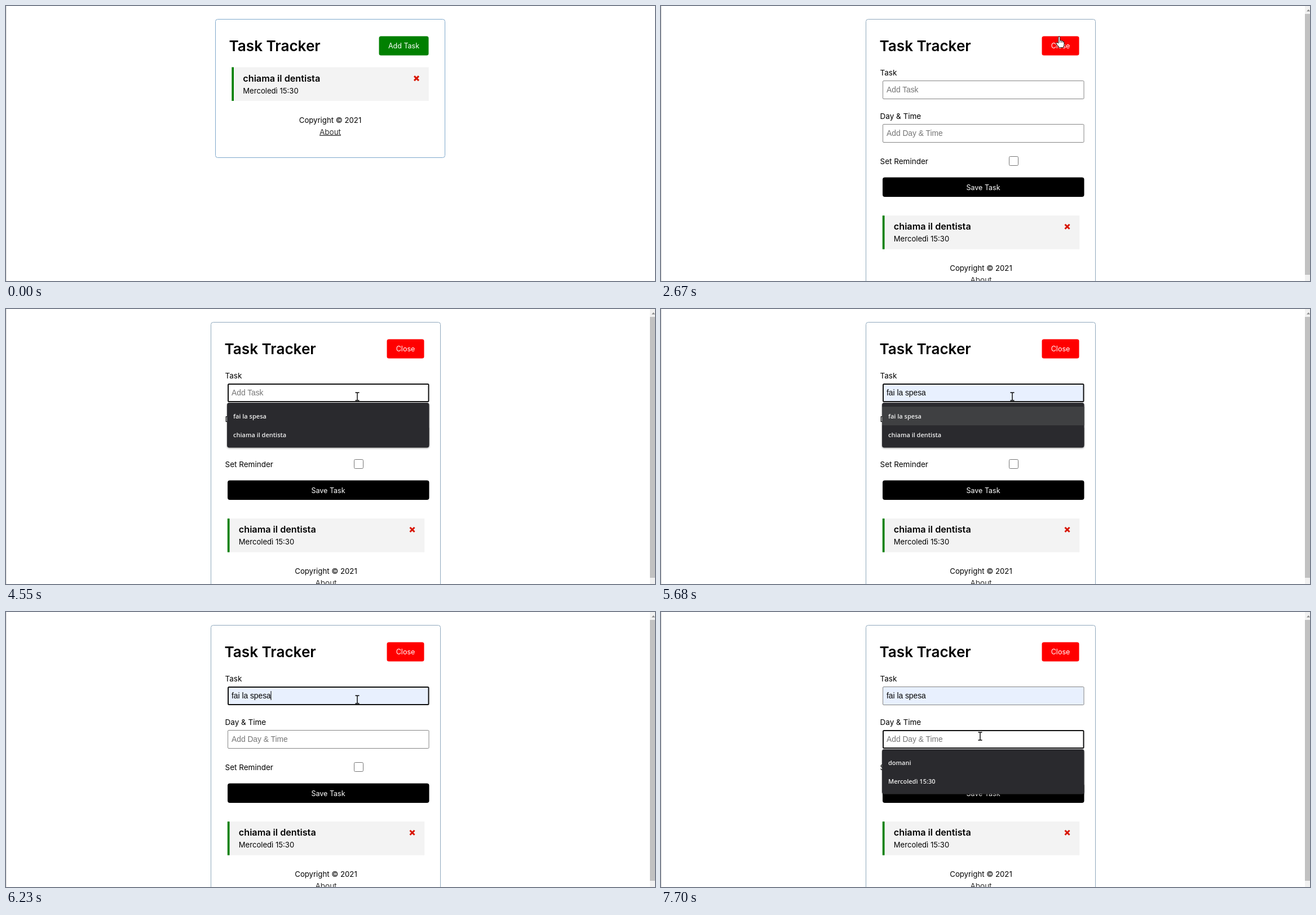
Recreate the animation shown at these times as an HTML page. Size 1151 by 487 pixels, loop 8000 ms.

```html
<!DOCTYPE html>
<html lang="en">
<head>
<meta charset="utf-8">
<title>Task Tracker</title>
<style>
  html, body { margin: 0; width: 100%; height: 100%; overflow: hidden; background: #fff; }
  svg { display: block; width: 100%; height: 100%; }
  text { font: 13.2px Inter, "Open Sans", sans-serif; }
  .title { font-size: 26.1px; font-weight: 600; }
  .task { font-size: 16.2px; font-weight: 600; }
  .when { font-size: 13.1px; }
  .button { font-size: 12.5px; fill: #fff; text-anchor: middle; }
  .label { font-size: 13.5px; }
  .middle { text-anchor: middle; }
  .field { font: 13.8px "Liberation Sans", Arial, sans-serif; }
  .option { font: 600 11px "Open Sans", "Noto Sans", sans-serif; fill: #f0f0f0; }
</style>
</head>
<body>
<svg id="stage" viewBox="0 0 1151 487">
  <defs>
    <filter id="shadow" x="-5%" y="-10%" width="110%" height="125%">
      <feDropShadow dx="0" dy="1" stdDeviation="1.5" flood-opacity=".4"/>
    </filter>
  </defs>
  <g id="scene"></g>
</svg>
<script>
const LOOP = 8000;
const FORM_OPENS = 2670, TASK_FOCUS = 4020, PREVIEW = 5680, CHOSEN = 6030, DAY_FOCUS = 7170;
const scene = document.getElementById('scene');

const rect = (x, y, w, h, fill, more = '') =>
  `<rect x="${x}" y="${y}" width="${w}" height="${h}" fill="${fill}" ${more}/>`;
const text = (x, y, words, style, more = '') =>
  `<text x="${x}" y="${y}" class="${style}" ${more}>${words}</text>`;
const group = (x, y, content, more = '') =>
  `<g transform="translate(${x} ${y})" ${more}>${content}</g>`;
const within = (t, start, end) => t >= start && t < end;

const moves = [
  { start: 510, end: 710, steps: 4, from: [980, 509], to: [760, 248] },
  { start: 1040, end: 1530, steps: 8, from: [760, 248], to: [707, 53] },
  { start: 1790, end: 1791, steps: 2, from: [706, 54], to: [706, 54] },
  { start: 3330, end: 3750, steps: 7, from: [706, 54], to: [623, 155] },
  { start: 6560, end: 6900, steps: 6, from: [623, 155], to: [566, 220] }
];

function pointerAt(t) {
  const move = moves.filter(m => t >= m.start).pop();
  if (!move) return null;
  const interval = (move.end - move.start) / (move.steps - 1);
  const step = Math.floor((t - move.start) / interval + 1e-3) + 1;
  const p = Math.min(1, step / move.steps);
  const eased = p * p * (3 - 2 * p);
  return move.from.map((a, i) => Math.round(a + (move.to[i] - a) * eased));
}

const shapes = {
  arrow: '<path d="M0 0V15L3.6 11.7 6 17 8.2 16 5.9 10.8H10.6Z" fill="#fff" stroke="#000" stroke-width=".9"/>',
  hand: '<path d="M-1.2 12V1.6Q-1.2 0 .2 0T1.6 1.6V7Q4 6 4.5 7.8 6.6 7 7 8.8 9 8.6 9 10.4V14Q9 16 7.2 19.6H0Q-1.5 17-5 12.7-5.8 10.7-4 10.6-2.4 10.8-1.2 12Z" fill="#fff" stroke="#000" stroke-width=".9"/>' +
    '<path d="M1.6 7V11M4.5 8V11M7 9V11" stroke="#000" stroke-width=".8"/>',
  beam: '<path d="M-3.5-7H-1Q0-7 0-6 0-7 1-7H3.5M0-6V6M-3.5 7H-1Q0 7 0 6 0 7 1 7H3.5" fill="none" stroke="#000" stroke-width="1.4"/>'
};

function shapeAt([x, y], formOpen) {
  if (y < 88 && y >= 53 && x > (formOpen ? 675 : 661) && x < 750) return 'hand';
  if (formOpen && (within(y, 132, 165) || within(y, 209, 242))) return 'beam';
  return 'arrow';
}

function header(formOpen, pressed) {
  const [label, fill, centre, width] = formOpen ? ['Close', 'red', 716.5, 66] : ['Add Task', 'green', 705.5, 88];
  const scale = pressed ? 0.98 : 1;
  const button = rect(-width / 2, -17, width, 34, fill, 'rx="3.5"') + text(0, 4.5, label, 'button');
  return rect(371.5, 23.5, 407, 245 + (formOpen ? 263 : 0), 'none',
      `rx="4" stroke="${formOpen ? '#8fa8bd' : '#7fa9cc'}"`) +
    text(395.5, 80, 'Task Tracker', 'title') +
    `<g transform="translate(${centre} 70.5) scale(${scale})">${button}</g>`;
}

const taskItem = () =>
  rect(400.3, 108.4, 349.4, 59.6, '#f3f3f3') + rect(400.3, 108.4, 3.7, 59.6, 'green') +
  text(420.3, 133.5, 'chiama il dentista', 'task') +
  text(420.3, 154.5, 'Mercoledì 15:30', 'when') +
  '<path d="M724 124.1L732 132.1M732 124.1L724 132.1" stroke="#d81400" stroke-width="3"/>';

const footer = () =>
  text(575, 207, 'Copyright © 2021', 'middle') +
  text(575, 227.5, 'About', 'label middle', 'fill="#333" text-decoration="underline"');

function input(y, placeholder, value, focused, hovered) {
  const border = focused ? '#101010' : hovered ? '#555' : '#858585';
  const line = focused ? 2 : 1, inset = line / 2;
  return rect(393 + inset, y + inset, 357.5 - line, 33 - line, value ? '#e8f0fe' : '#fff',
      `rx="1.5" stroke="${border}" stroke-width="${line}"`) +
    text(400, y + 21, value || placeholder, 'field', `fill="${value ? '#000' : '#757575'}"`);
}

function dropdown(y, options, highlighted, opacity = 1, shift = 0) {
  const width = 358.5 - 1.4 * shift;
  return group(392 + shift, y + shift * 0.3,
    rect(0, 0, width, 79.5, '#292a2d', 'rx="4" filter="url(#shadow)"') +
    (highlighted ? rect(0, 7, width, 33, '#3f4042') : '') +
    options.map((option, i) => text(11, 27.5 + 33 * i, option, 'option')).join(''),
    `opacity="${opacity}"`);
}

const caret = (x, y) => rect(x, y, 1, 16, '#000');

function form(t, pointer) {
  const value = t >= PREVIEW ? 'fai la spesa' : '';
  const taskFocused = within(t, TASK_FOCUS, DAY_FOCUS), dayFocused = t >= DAY_FOCUS;
  let out = text(388.5, 123, 'Task', 'label') +
    input(132, 'Add Task', value, taskFocused, within(pointer[1], 132, 165)) +
    text(388.5, 200, 'Day &amp; Time', 'label') +
    input(209, 'Add Day &amp; Time', '', dayFocused, within(pointer[1], 209, 242)) +
    text(388.5, 279.5, 'Set Reminder', 'label') +
    rect(617.5, 266.5, 16, 16, '#fff', 'rx="2" stroke="#767676"') +
    rect(393, 303.5, 357.5, 34.5, '#000', 'rx="4"') +
    text(571.5, 325.5, 'Save Task', 'button');

  if (within(t, 4020, 4550) || within(t, 5080, 5610)) out += caret(400, 140);
  if (within(t, 6030, 6560) || within(t, 7100, DAY_FOCUS)) out += caret(469.5, 140);
  if (within(t, DAY_FOCUS, 7700)) out += caret(400, 218);

  if (within(t, TASK_FOCUS, 6230)) {
    const [opacity, shift] = t < CHOSEN ? [1, 0] : t < 6100 ? [0.85, 1.5] : t < 6160 ? [0.42, 5.5] : [0.15, 8];
    out += dropdown(166, ['fai la spesa', 'chiama il dentista'], t >= PREVIEW, opacity, shift);
  }
  if (dayFocused) out += dropdown(243, ['domani', 'Mercoledì 15:30'], false);
  return out;
}

const scrollbar = () =>
  rect(1142, 0, 9, 487, '#f1f1f1') + rect(1142, 14, 9, 462, '#c1c1c1') +
  '<path d="M1145 9.5L1148.3 6 1151 9.5Z" fill="#888"/>';

function render(t) {
  const formOpen = t >= FORM_OPENS;
  const pointer = pointerAt(t);
  const pressed = within(t, 2470, FORM_OPENS);
  const clicked = pressed || within(t, TASK_FOCUS, 4220) || within(t, DAY_FOCUS, 7370);
  let out = rect(0, 0, 1, 487, '#d8d8d8') +
    group(formOpen ? -8 : 0, 0, header(formOpen, pressed)) +
    group(formOpen ? -7.5 : 0, formOpen ? 262.7 : 0, taskItem()) +
    group(formOpen ? -7.5 : 0, formOpen ? 262.3 : 0, footer());
  if (formOpen) out += form(t, pointer) + scrollbar();
  if (pointer) {
    const ring = clicked ? '<circle cx="-1" cy="-.5" r="11" fill="#ff0" opacity=".47"/>' : '';
    out += group(...pointer, ring + shapes[shapeAt(pointer, formOpen)]);
  }
  return out;
}

let shown = '';
function tick() {
  const next = render(performance.now() % LOOP);
  if (next !== shown) scene.innerHTML = shown = next;
  requestAnimationFrame(tick);
}
tick();
</script>
</body>
</html>
```
